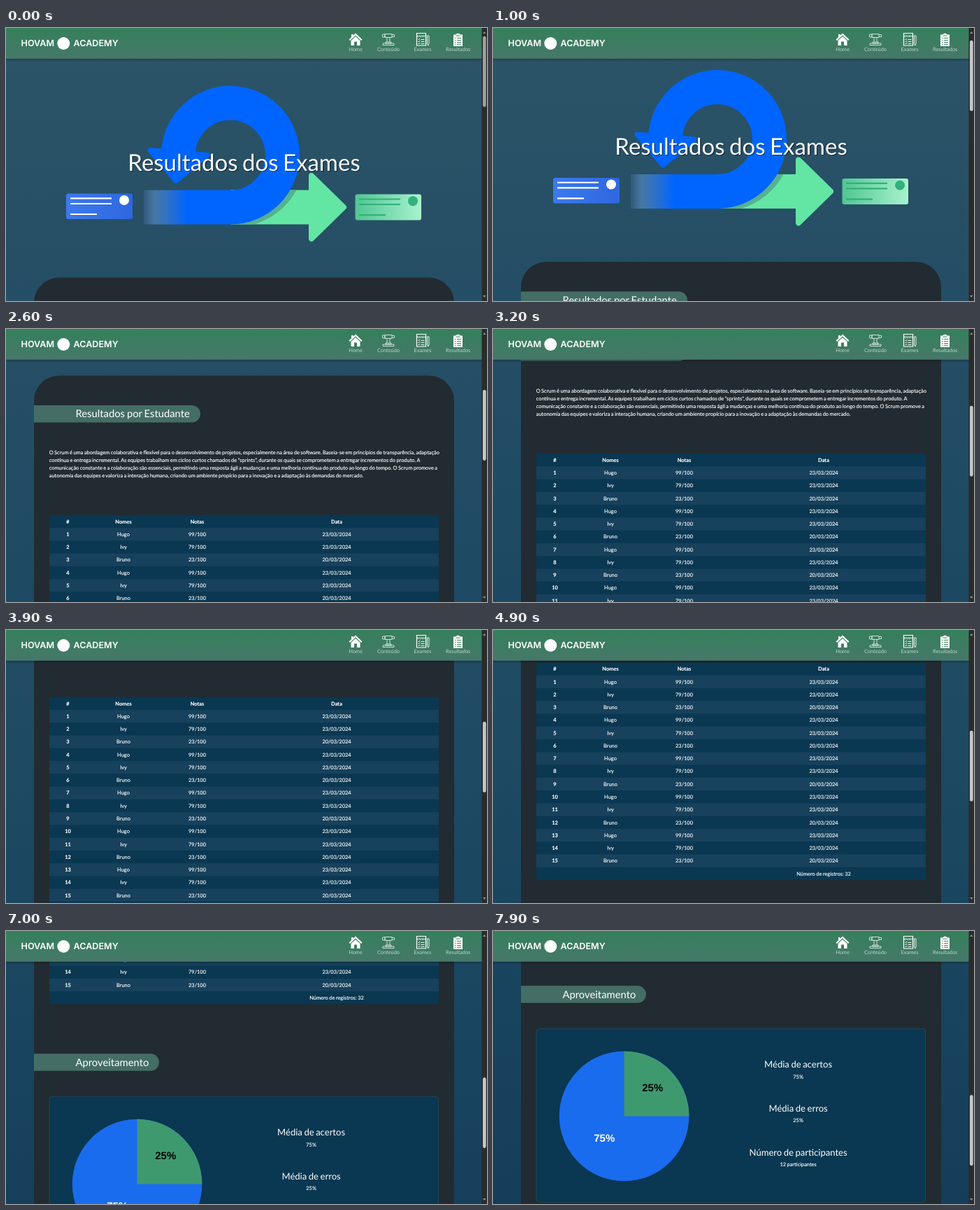
Recreate the animation shown at these times as an HTML page. Size 688x390 px, loop 8000 ms.

```html
<!DOCTYPE html>
<html lang="pt">
<head>
<meta charset="utf-8">
<title>Resultados dos Exames</title>
<style>
  html, body { margin: 0; width: 100%; height: 100%; overflow: hidden; background: #222b31; }
  svg { display: block; width: 688px; height: 390px; }
  text { font-family: Lato, sans-serif; fill: #fff; word-spacing: -.06em; text-rendering: geometricPrecision; }
  .mid { text-anchor: middle; }
  .small { font-size: 7.45px; stroke: #fff; stroke-width: .15px; }
  .head { font-size: 14.8px; }
  .stat { font-size: 13.05px; }
  .bold { font-weight: 700; }
  .hero { font-size: 33px; }
  .brand { font: 600 12.6px Inter, sans-serif; }
  .nav { font-size: 7.4px; fill: #bdd6c9; }
  .pct { font: 700 15px "Liberation Sans", Arial, sans-serif; }
</style>
</head>
<body>
<svg viewBox="0 0 688 390">
  <defs>
    <linearGradient id="sky" x2="0" y2="1">
      <stop stop-color="#2d5468"/><stop offset=".5" stop-color="#1d4963"/><stop offset="1" stop-color="#113a57"/>
    </linearGradient>
    <linearGradient id="bar" x2="0" y2="1">
      <stop stop-color="#35805b"/><stop offset="1" stop-color="#46786a"/>
    </linearGradient>
    <linearGradient id="shade" x2="0" y2="1">
      <stop stop-opacity=".3"/><stop offset="1" stop-opacity="0"/>
    </linearGradient>
    <linearGradient id="tail">
      <stop stop-color="#31597a"/><stop offset=".25" stop-color="#4678a4"/>
      <stop offset=".6" stop-color="#2a70cc"/><stop offset="1" stop-color="#0065ff"/>
    </linearGradient>
    <linearGradient id="blueCard">
      <stop stop-color="#3c7aee"/><stop offset="1" stop-color="#2f67de"/>
    </linearGradient>
    <linearGradient id="greenCard">
      <stop stop-color="#50c692"/><stop offset="1" stop-color="#a8f2ce"/>
    </linearGradient>
    <clipPath id="band"><rect x="321" y="231.5" width="112" height="49"/></clipPath>
  </defs>

  <g id="page">
    <rect width="681" height="1413" fill="url(#sky)"/>

    <g fill="#63e6a3">
      <rect x="321" y="231.5" width="114" height="49"/>
      <path d="M437 211 483 256 437 301Z" stroke="#63e6a3" stroke-width="8" stroke-linejoin="round"/>
    </g>
    <circle cx="328" cy="185" r="99" fill="#55b28f" clip-path="url(#band)"/>
    <g transform="translate(0 .6)">
      <rect x="197" y="231" width="62" height="49" fill="url(#tail)"/>
      <path d="M246.5 178A74.5 74.5 0 1 1 321 255.5H258" fill="none" stroke="#0065ff" stroke-width="49"/>
      <path d="M206 174 288 181 243 218Z" fill="#0065ff" stroke="#0065ff" stroke-width="7" stroke-linejoin="round"/>
    </g>

    <rect x="86" y="236.5" width="95" height="36.5" rx="3" fill="url(#blueCard)"/>
    <circle cx="169" cy="246" r="7" fill="#fff"/>
    <path d="M92 243.3H151M92 251H151M92 266H130" stroke="#fff" stroke-width="2.2"/>
    <rect x="499.5" y="237.5" width="94.5" height="37" rx="3" fill="url(#greenCard)"/>
    <circle cx="582" cy="247.2" r="7" fill="#33b07b"/>
    <path d="M505 244.5H564M505 252H564M505 267.2H543" stroke="#33b07b" stroke-width="2.2"/>

    <text class="hero mid" x="341.7" y="205" style="fill:#000" opacity=".5">Resultados dos Exames</text>
    <text class="hero mid" x="340.5" y="203.7">Resultados dos Exames</text>

    <path d="M40 1413V392.6A36 36 0 0 1 76 356.6H605A36 36 0 0 1 641 392.6V1413Z" fill="#222b31"/>
    <g id="body"></g>
  </g>

  <rect y="43" width="681" height="5" fill="url(#shade)"/>
  <rect width="681" height="43.8" fill="url(#bar)"/>
  <text class="brand" x="21.5" y="26.4">HOVAM</text>
  <circle cx="82.3" cy="22" r="9" fill="#fff"/>
  <text class="brand" x="96.5" y="26.4">ACADEMY</text>

  <g fill="#fff">
    <path d="M500 7.5 509.5 16.5 508 18 500 10.6 492 18 490.5 16.5 494 13.2V9H496.5V10.8Z"/>
    <path d="M500 12 506.5 18V25H502V19.5H498V25H493.5V18Z"/>
  </g>
  <g fill="none" stroke="#dcebe3" stroke-width=".9">
    <path d="M538.5 9H542V13H538.5ZM542 8.5H552V13.5H542ZM552 9.5H555.5V12.5H552M545 13.5V20M549 13.5V20M543 20H551V22H543ZM539 24.5V22H555V24.5Z"/>
    <path d="M587.5 7.5H600.5V25H587.5Z" stroke="#fff" stroke-width="1.2"/>
    <path d="M589.5 16 590.5 17 592 15M589.5 19 590.5 20 592 18M589.5 22 590.5 23 592 21M593.5 16.5H598.5M593.5 19.5H598.5M593.5 22.5H598.5" stroke="#fff"/>
    <path d="M602.5 11H605V22L603.75 25 602.5 22Z" stroke="#fff"/>
  </g>
  <text class="mid bold" x="594" y="13.2" font-size="4">EXAM</text>
  <path d="M640 9.5H643.5V8.5H645A1.6 1.6 0 0 1 648 8.5H649.5V9.5H653V26H640Z" fill="#fff"/>
  <path d="M643.5 11.2H649.5M642 14.5H643.5M645 14.5H651M642 17.5H643.5M645 17.5H651M642 20.5H643.5M645 20.5H651M642 23.2H643.5M645 23.2H651" stroke="#42795f"/>
  <g id="nav"></g>

  <rect x="680.5" width="7.5" height="390" fill="#2b2b2b"/>
  <path d="M682 8 684.3 5 686.6 8ZM682 382 684.3 385 686.6 382Z" fill="#8c8c8c"/>
  <rect id="thumb" x="682" y="11.8" width="4.7" height="101" rx="2.3"/>
</svg>

<script>
const $ = id => document.getElementById(id);
const text = (cls, x, y, str) => `<text class="${cls}" x="${x}" y="${y}">${str}</text>`;
const rect = (x, y, w, h, fill, more = '') =>
  `<rect x="${x}" y="${y}" width="${w}" height="${h}" fill="${fill}" ${more}/>`;

const pill = (y, right, str) =>
  `<path d="M40 ${y}H${right - 12.25}a12.25 12.25 0 0 1 0 24.5H40Z" fill="#446d65"/>` +
  text('head', 99.5, y + 17.4, str);

const intro = [
  'O Scrum é uma abordagem colaborativa e flexível para o desenvolvimento de projetos, especialmente na área de software. Baseia-se em princípios de transparência, adaptação',
  'contínua e entrega incremental. As equipes trabalham em ciclos curtos chamados de "sprints", durante os quais se comprometem a entregar incrementos do produto. A',
  'comunicação constante e a colaboração são essenciais, permitindo uma resposta ágil a mudanças e uma melhoria contínua do produto ao longo do tempo. O Scrum promove a',
  'autonomia das equipes e valoriza a interação humana, criando um ambiente propício para a inovação e a adaptação às demandas do mercado.'
];

const students = [
  ['Hugo', '99/100', '23/03/2024'],
  ['Ivy', '79/100', '23/03/2024'],
  ['Bruno', '23/100', '20/03/2024']
];
const columns = [88.5, 168, 273.5, 473];
const rowHeight = 18.27, tableTop = 555.8, dark = '#0a3751', light = '#17415c';

function table() {
  let out = rect(62, tableTop, 557, rowHeight * 17, dark, 'rx="2"');
  const row = (i, cells, bold) => cells.forEach((cell, c) => {
    const cls = 'mid small' + (bold || c === 0 ? ' bold' : '');
    out += text(cls, columns[c], tableTop + rowHeight * (i + .5) + 2.6, cell);
  });
  row(0, ['#', 'Nomes', 'Notas', 'Data'], true);
  for (let i = 1; i <= 15; i++) {
    if (i % 2) out += rect(62, tableTop + rowHeight * i, 557, rowHeight, light);
    row(i, [i, ...students[(i - 1) % 3]]);
  }
  return out + text('mid small', 473, tableTop + rowHeight * 16.5 + 2.6, 'Número de registros: 32');
}

function chart() {
  const stats = [['Média de acertos', '75%'], ['Média de erros', '25%'],
    ['Número de participantes', '12 participantes']];
  return rect(62, 998.8, 556.5, 247.5, dark, 'rx="4" stroke="#23505c" stroke-width=".8"') +
    '<circle cx="187.6" cy="1123.5" r="92.8" fill="#1a6cee"/>' +
    '<path d="M187.6 1123.5V1030.7A92.8 92.8 0 0 1 280.4 1123.5Z" fill="#3f996f"/>' +
    '<text class="pct mid" x="228.3" y="1088.3" style="fill:#000">25%</text>' +
    text('pct mid', 159.3, 1160.4, '75%') +
    stats.map(([label, value], i) =>
      text('mid stat', 436.6, 1054.2 + i * 62.7, label) +
      text('mid small', 436.6, 1069.5 + i * 62.7, value)).join('');
}

$('body').innerHTML =
  pill(399, 278, 'Resultados por Estudante') +
  intro.map((line, i) => text('small', 61.7, 468.6 + i * 11, line)).join('') +
  table() + pill(937.3, 219, 'Aproveitamento') + chart();

$('nav').innerHTML = [[500, 'Home'], [547, 'Conteúdo'], [596, 'Exames'], [646.7, 'Resultados']]
  .map(([x, label]) => text('mid nav', x, 33.4, label)).join('');

// Scroll keys: [ms, px], joined by a monotone cubic.
const keys = [[700, 0], [1700, 149], [2600, 290], [3900, 460], [4700, 508],
  [4800, 508], [5900, 599], [7000, 762], [7900, 859]];
const secant = keys.slice(1).map(([t, s], i) => (s - keys[i][1]) / (t - keys[i][0]));
const slope = keys.map((_, i) => {
  const a = secant[i - 1], b = secant[i];
  if (i === 0) return 0;
  if (b === undefined) return a;
  return a * b > 0 ? 2 * a * b / (a + b) : 0;
});

function scrollAt(t) {
  if (t <= keys[0][0]) return 0;
  const i = keys.findIndex(k => t <= k[0]) - 1;
  if (i < 0) return keys[keys.length - 1][1];
  const [t0, s0] = keys[i], [t1, s1] = keys[i + 1];
  const h = t1 - t0, u = (t - t0) / h, v = 1 - u;
  return s0 * v * v * (1 + 2 * u) + s1 * u * u * (3 - 2 * u) +
    h * u * v * (slope[i] * v - slope[i + 1] * u);
}

const page = $('page'), thumb = $('thumb');
function draw() {
  const t = performance.now() % 8000;
  const s = scrollAt(Math.floor(t / 100) * 100);
  page.setAttribute('transform', `translate(0 ${-s})`);
  thumb.setAttribute('y', 11.8 + s * .259);
  thumb.setAttribute('fill', s ? '#c6c6c6' : '#9f9f9f');
  requestAnimationFrame(draw);
}
draw();
</script>
</body>
</html>
```
